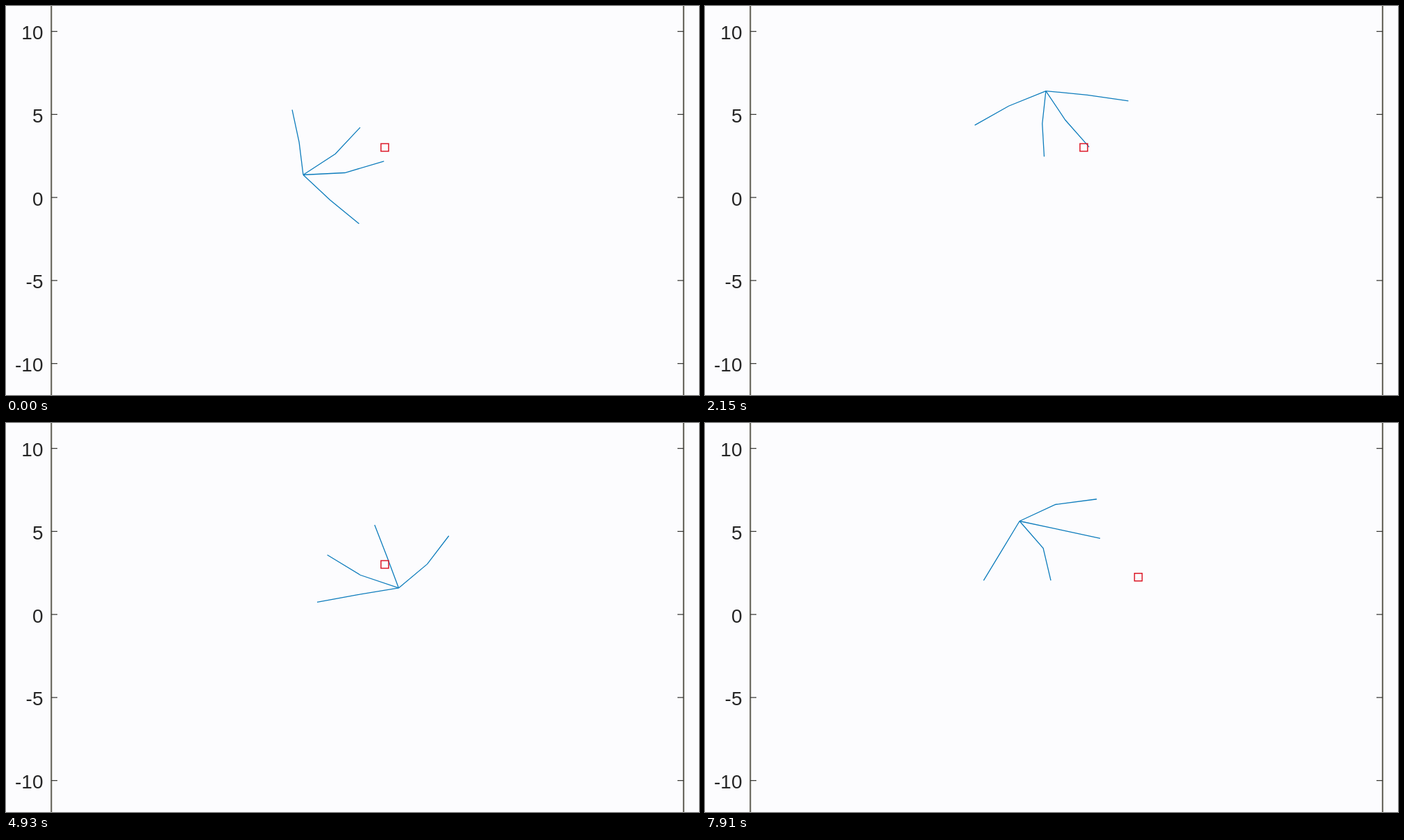
These frames come from a looping animation (998 px wide and 561 px high, 8 s). An HTML page:

```html
<!DOCTYPE html>
<html lang="en">
<head>
<meta charset="utf-8">
<title>Four-legged walker</title>
<style>
  html, body { margin: 0; width: 100%; height: 100%; overflow: hidden; background: #fcfcfe; }
  svg { display: block; width: 100%; height: 100%; }
  text { font: 28px "Liberation Sans", Arial, sans-serif; fill: #262626; text-anchor: end; }
  .axis { stroke: #5c5b50; stroke-width: 2; }
  .tick { stroke: #3a3a36; stroke-width: 1.3; }
  .leg { fill: none; stroke: #0d7cbc; stroke-width: 1.3; }
  .goal { fill: none; stroke: #dc1626; stroke-width: 1.5; }
</style>
</head>
<body>
<svg viewBox="0 0 998 561">
  <g id="plot">
    <path class="axis" d="M65.3 0V561M975.8 0V561"/>
  </g>
  <g id="legs"></g>
  <rect id="goal" class="goal" x="-5.5" y="-5.5" width="11" height="11"/>
</svg>
<script>
const LOOP = 8000, SCALE_X = 30.37, SCALE_Y = 23.95, SEGMENT = 1.98;
const ORBIT = { x: -0.2, y: 3.7 };
const GOAL_SWITCH = 106;
const RAD = Math.PI / 180;

// step, body x, body y (px), four hip angles, four knee bends (degrees)
const POSES = [
  [0, 428, 243.5, 95.6, 39.6, 3.6, -50, 4, 14, 17, 4],
  [18, 425, 187, 54, -2, -34, -88, -5, 5, 6, 8],
  [29, 443, 151, 28.3, -27, -57, -117, -10.7, 0, 0, 10.6],
  [61, 551, 126, -42.4, -97.4, -132.8, -188.5, 4, 14, 15, 6],
  [66, 566, 134, -41, -108, -147, -206, 3, 4, 8, 9],
  [83, 597.5, 174, -109.3, -144, -194.7, -264.3, -19, -30, -14, 20],
  [124, 485.5, 245.5, -224.2, -259.5, -309.7, -360, 20.6, 0, 14.6, 5],
  [152, 432, 183.5, -284.7, -340.4, -380.7, -441, -20, 10, -25, 6],
  [169, 453, 141.5, -329.6, -375.2, -415.5, -475.5, -21, 0, -24, 0]
];

const toPx = (x, y) => [520.5 + x * SCALE_X, 276 - y * SCALE_Y];

// Body positions become clockwise angle and radius around the orbit centre.
let lastAngle = 220 * RAD;
const keys = POSES.map(([step, px, py, ...joints]) => {
  const x = (px - 520.5) / SCALE_X - ORBIT.x;
  const y = (276 - py) / SCALE_Y - ORBIT.y;
  let angle = Math.atan2(y, x);
  angle += 2 * Math.PI * Math.round((lastAngle - angle) / (2 * Math.PI));
  lastAngle = angle;
  return [step, angle, Math.hypot(x, y), ...joints];
});

const svgNode = (name, attrs, parent) => {
  const node = document.createElementNS("http://www.w3.org/2000/svg", name);
  for (const key in attrs) node.setAttribute(key, attrs[key]);
  return parent.appendChild(node);
};

const plot = document.getElementById("plot");
for (const value of [10, 5, 0, -5, -10]) {
  const y = 276.2 - value * SCALE_Y;
  svgNode("path", { class: "tick", d: `M65 ${y}H74M967 ${y}H976` }, plot);
  svgNode("text", { x: 53.5, y: y + 11.3 }, plot).textContent = value;
}

const legs = [0, 1, 2, 3].map(() =>
  svgNode("polyline", { class: "leg" }, document.getElementById("legs")));
const goal = document.getElementById("goal");

// Steps come in groups of three, shown for 20, 20 and 100 ms.
function stepAt(time) {
  const since = time - 30;
  const group = Math.floor(since / 140);
  const rest = since - group * 140;
  return Math.max(0, group * 3 - 1 + (rest < 20 ? 0 : rest < 40 ? 1 : 2));
}

function poseAt(step) {
  let i = 0;
  while (i < keys.length - 2 && keys[i + 1][0] <= step) i++;
  const a = keys[i], b = keys[i + 1];
  const k = Math.min(1, (step - a[0]) / (b[0] - a[0]));
  return a.map((v, j) => v + (b[j] - v) * k);
}

function draw(time) {
  const step = stepAt(time);
  const [, angle, radius, ...joints] = poseAt(step);
  const bodyX = ORBIT.x + radius * Math.cos(angle);
  const bodyY = ORBIT.y + radius * Math.sin(angle);

  legs.forEach((leg, i) => {
    const hip = joints[i] * RAD, shin = hip + joints[i + 4] * RAD;
    const kneeX = bodyX + SEGMENT * Math.cos(hip);
    const kneeY = bodyY + SEGMENT * Math.sin(hip);
    const points = [
      toPx(bodyX, bodyY),
      toPx(kneeX, kneeY),
      toPx(kneeX + SEGMENT * Math.cos(shin), kneeY + SEGMENT * Math.sin(shin))
    ];
    leg.setAttribute("points", points.map(p => p.map(v => v.toFixed(2))).join(" "));
  });

  goal.setAttribute("transform",
    step < GOAL_SWITCH ? "translate(545.5 204)" : "translate(624 222.3)");
}

const start = performance.now();
function tick() {
  draw((performance.now() - start) % LOOP);
  requestAnimationFrame(tick);
}
tick();
</script>
</body>
</html>
```
